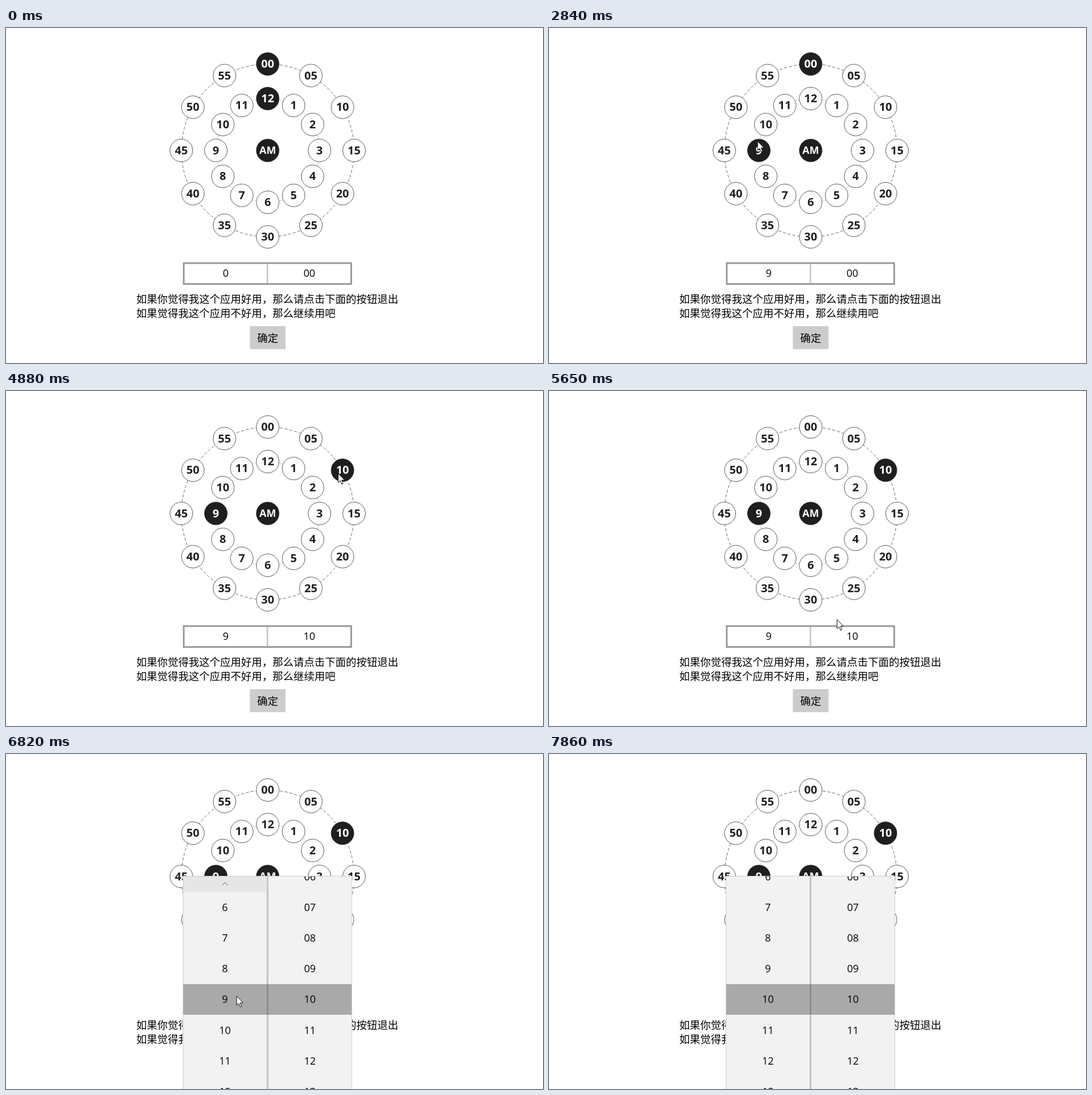
Recreate the animation shown at these times as an HTML page. Size 948 px wide and 591 px high, loop 8000 ms.

```html
<!DOCTYPE html>
<html lang="zh-CN">
<head>
<meta charset="utf-8">
<style>
  html, body { margin: 0; width: 100%; height: 100%; overflow: hidden; background: #fff; }
  svg { display: block; width: 948px; height: 591px; }
  text { font: 18px "Open Sans", "Noto Sans", sans-serif; fill: #000; }
  .mid { text-anchor: middle; }
  .dial text { font-weight: 700; font-size: 20px; fill: #1f1f1f; }
  .dial circle { fill: #fff; stroke: #444; stroke-width: .9; }
  .dial .on circle { fill: #1f1f1f; stroke: #1f1f1f; }
  .dial .on text { fill: #fff; }
  .dial .ring { fill: none; stroke: #555; }
  .cjk { font: 18.5px "Noto Sans CJK SC", "Noto Sans CJK", sans-serif; }
</style>
</head>
<body>
<svg viewBox="0 0 948 591" xmlns="http://www.w3.org/2000/svg">
  <defs><clipPath id="inside"><rect x="313" y="216" width="297" height="380"/></clipPath></defs>
  <g id="dial" class="dial"></g>

  <rect id="frame" x="313.8" y="414.8" width="295.6" height="36.8" stroke-width="3"/>
  <path id="split" d="M461.5 416.3V450" stroke-width="3"/>
  <text id="hourText" class="mid" x="388" y="439.4"></text>
  <text id="minuteText" class="mid" x="535.6" y="439.4"></text>
  <text class="cjk" x="230" y="485">如果你觉得我这个应用好用，那么请点击下面的按钮退出</text>
  <text class="cjk" x="230" y="509.5">如果觉得我这个应用不好用，那么继续用吧</text>
  <rect x="430.5" y="526" width="63" height="40.5" fill="#ccc"/>
  <text class="cjk mid" x="462" y="553.5">确定</text>

  <g id="popup">
    <rect x="312.5" y="215.5" width="298" height="400" fill="#f2f2f2" stroke="#ccc"/>
    <g clip-path="url(#inside)">
      <rect id="rowHover" x="313" y="460" width="148" height="54"/>
      <rect x="313" y="406" width="297" height="54" fill="#a9a9a9"/>
      <path d="M461.7 216V600" stroke="#c1c1c1" stroke-width="3"/>
      <path d="M461.7 406V460" stroke="#8a8a8a" stroke-width="3"/>
      <g id="hours"></g>
      <g id="minutes"></g>
      <g id="upButton">
        <rect x="313" y="216" width="147.5" height="27.5" fill="#e6e6e6"/>
        <path d="M381.3 231.7l5-5l5 5" fill="none" stroke="#666"/>
      </g>
    </g>
  </g>

  <path id="cursor" d="M.5 .5V16.5L4.1 13.2L6.8 19.4L9.2 18.3L6.6 12.2H11.8Z" fill="#fff" stroke="#112"/>
</svg>
<script>
const LOOP = 8000, TICK = 77, CX = 462, CY = 216, ROW = 54.2;
const byId = id => document.getElementById(id);
const pad = n => String(n).padStart(2, "0");
const show = (id, visible) => byId(id).setAttribute("display", visible ? "inline" : "none");

function set(node, attrs) {
  for (const key in attrs) node.setAttribute(key, attrs[key]);
  return node;
}

function add(parent, tag, attrs = {}, text = "") {
  const node = set(document.createElementNS("http://www.w3.org/2000/svg", tag), attrs);
  node.textContent = text;
  return parent.appendChild(node);
}

function addKnob(x, y, label, size = 20) {
  const knob = add(byId("dial"), "g");
  add(knob, "circle", { cx: x, cy: y, r: 20 });
  add(knob, "text", { class: "mid", x, y: y + size / 3, style: `font-size:${size}px` }, label);
  return knob;
}

function addRing(r, dash, label) {
  add(byId("dial"), "circle", { class: "ring", cx: CX, cy: CY, r, "stroke-dasharray": dash });
  return Array.from({ length: 12 }, (_, i) => {
    const a = i * Math.PI / 6;
    return addKnob(CX + r * Math.sin(a), CY - r * Math.cos(a), label(i));
  });
}

function addColumn(id, x, format) {
  for (let n = 5; n <= 13; n++)
    add(byId(id), "text", { class: "mid", x, y: 439.4 + n * ROW }, format(n));
}

const scrollTo = (id, value) => set(byId(id), { transform: `translate(0 ${-value * ROW})` });
const pick = (knobs, index) => knobs.forEach((k, i) => set(k, { class: i === index ? "on" : "" }));

const minuteKnobs = addRing(152.5, "5.4 3.2", i => pad(i * 5));
const hourKnobs = addRing(91.5, "1 2", i => i || 12);
set(addKnob(CX, CY, "AM", 18), { class: "on" });
addColumn("hours", 386.5, String);
addColumn("minutes", 536.5, pad);
scrollTo("minutes", 10);

function glide(t, start, end) {
  if (t < start) return 0;
  const jumps = Math.round((end - start) / TICK) + 1;
  const k = Math.min(1, (Math.floor((t - start) / TICK) + 1) / jumps);
  return 1 - (1 - k) ** 2;
}

// Pointer stops: departure, arrival, place, sideways bend of the path.
const stops = [
  [70, 840, 511, 142, 0],
  [1130, 1670, 549, 207, 0],
  [1910, 2310, 370, 218, 0],
  [2840, 3400, 339, 148, .2],
  [3860, 4320, 586, 145, .43],
  [5110, 6190, 412, 429, -.6],
  [6750, 6820, 405, 426, 0],
  [7050, 7290, 390, 484, 0],
  [7600, 7860, 394, 596, 0]
];

function pointerAt(t) {
  let x = 453, y = 595;
  for (const [start, end, toX, toY, bend] of stops) {
    const u = glide(t, start, end), bow = 2 * u * (1 - u) * bend;
    const dx = toX - x, dy = toY - y;
    x += dx * u - dy * bow;
    y += dy * u + dx * bow;
    if (u < 1) break;
  }
  return [x, y];
}

function draw(t) {
  const hour = t < 990 ? 0 : t < 1840 ? 1 : t < 2610 ? 3 : 9;
  const minute = t < 3560 ? 0 : t < 4640 ? 50 : 10;
  pick(hourKnobs, hour);
  pick(minuteKnobs, minute / 5);
  byId("hourText").textContent = hour;
  byId("minuteText").textContent = pad(minute);

  const [x, y] = pointerAt(t);
  set(byId("cursor"), { transform: `translate(${x} ${y})` });

  const pressed = t >= 6270;
  const hover = x > 312 && x < 611 && y > 413 && y < 453;
  set(byId("frame"), { fill: pressed ? "#ccc" : "#fff", stroke: hover && !pressed ? "#666" : "#999" });
  set(byId("split"), { stroke: pressed ? "#999" : "#ccc" });

  show("popup", t >= 6430);
  show("upButton", t >= 6750 && t < 7690);
  show("rowHover", y > 460 && t < 7600);
  set(byId("rowHover"), { fill: t >= 7460 ? "#c2c2c2" : "#dadada" });
  scrollTo("hours", 9 + glide(t, 7530, 7860));
}

const begin = performance.now();
function tick() {
  draw((performance.now() - begin) % LOOP);
  requestAnimationFrame(tick);
}
tick();
</script>
</body>
</html>
```
